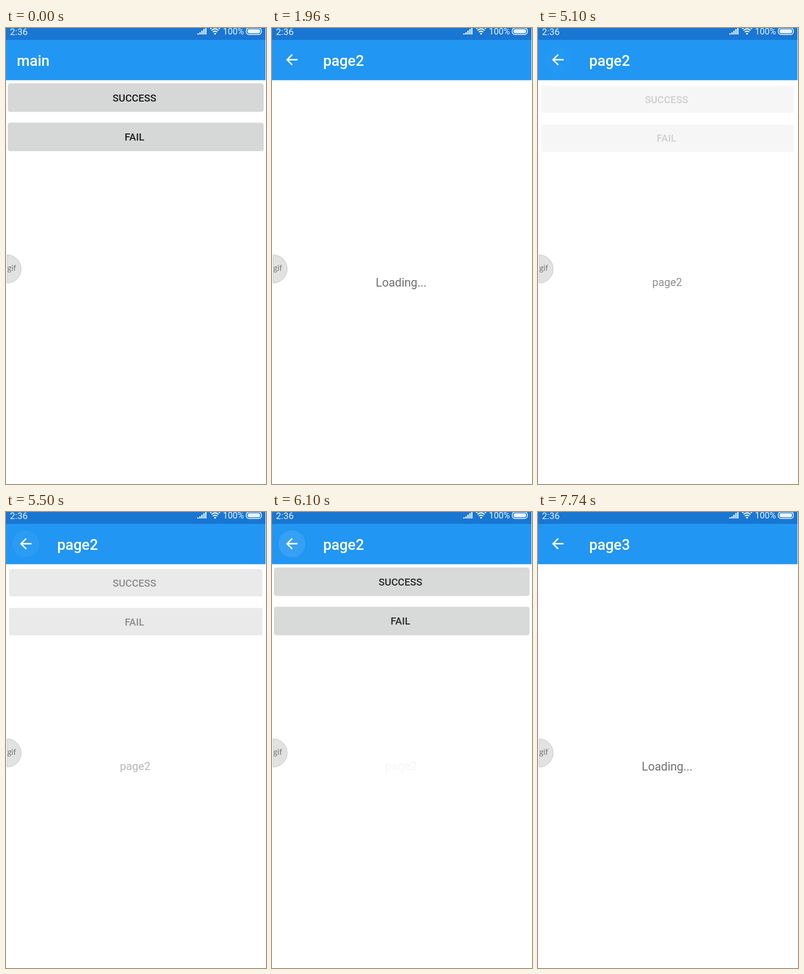
An HTML page that plays this animation: 480 px wide and 843 px high, repeating every 8000 ms.

```html
<!DOCTYPE html>
<html lang="en">
<head>
<meta charset="utf-8">
<title>Page transitions</title>
<style>
  html, body { margin: 0; width: 100%; height: 100%; overflow: hidden; background: #fff; }
  svg { display: block; width: 100%; height: 100%; font-family: Roboto, sans-serif; }
  .page { transform-origin: 238.5px 470px; text-anchor: middle; }
  .button rect { fill: #d6d7d7; filter: drop-shadow(0 .7px .8px #0006); }
  .button.pressed rect { filter: drop-shadow(0 2px 2.5px #0007); }
  .button text { font-size: 18.67px; font-weight: 500; fill: #1c1c1c; }
  #message { fill: #707070; }
</style>
</head>
<body>
<svg viewBox="0 0 480 843" preserveAspectRatio="none">
  <rect y="22" width="479" height="74.5" fill="#2196f3"/>
  <rect width="479" height="22" fill="#1976d2"/>

  <g fill="#fff" fill-opacity=".92" font-size="17">
    <text x="7.3" y="12.5">2:36</text>
    <text x="400.5" y="12" font-size="16">100%</text>
    <path d="M353 12v-2h3v2zM357 12v-4h2.4v4zM360.6 12v-7h2.4v7zM364.2 12v-10h2.4v10zM367.7 12v-13h2.4v13z"/>
    <circle cx="386" cy="10.5" r="1.8"/>
    <g fill="none" stroke="#fff" stroke-width="2">
      <path d="M382 7.5q4-3.6 8 0M379.5 4.5q6.5-6 13 0M377 1.5q9-8 18 0"/>
      <rect x="443.5" y="0" width="28" height="12" rx="5" stroke-width="1.4"/>
    </g>
    <rect x="446" y="2.3" width="23" height="7.4" rx="3"/>
  </g>

  <g id="back">
    <circle id="ripple" cx="36.5" cy="59" r="25" fill="#fff"/>
    <path transform="translate(20.5 42.7) scale(1.333)" fill="#fff"
      d="M20 11H7.83l5.59-5.59L12 4l-8 8 8 8 1.41-1.41L7.83 13H20z"/>
  </g>
  <text id="title" y="70" font-size="27.2" font-weight="500" fill="#fff"></text>

  <g id="menu" class="page">
    <g class="button" id="success">
      <rect x="4.5" y="103.5" width="470" height="50.5" rx="2.7"/>
      <text x="237.2" y="136">SUCCESS</text>
    </g>
    <g class="button" id="fail">
      <rect x="4.5" y="176" width="470" height="50.5" rx="2.7"/>
      <text x="237.2" y="208">FAIL</text>
    </g>
  </g>
  <text id="message" class="page" x="238.5"></text>

  <path d="M2 419.5a26 26 0 0 1 0 52z" fill="#e2e2e2" stroke="#c6c6c6"/>
  <text x="2.5" y="449" font-family="Lato, sans-serif" font-size="14.5" fill="#777">gif</text>
</svg>
<script>
const el = id => document.getElementById(id);
const clamp = v => Math.max(0, Math.min(1, v));

// [start time, share of the new page shown]
const OPEN_PAGE2 = [[1440, .27], [1540, .55], [1610, .76], [1690, .92], [1770, 1]];
const OPEN_PAGE3 = [[7500, 0], [7580, .4], [7660, .75], [7740, 1]];

const stepAt = (steps, t) => steps.reduce((v, [start, p]) => t >= start ? p : v, 0);

function fade(node, alpha, scale) {
  node.style.opacity = alpha;
  node.style.transform = `scale(${scale})`;
}

function setText(node, text) {
  if (node.textContent !== text) node.textContent = text;
}

function draw(t) {
  const tick = Math.floor(t / 100) * 100;
  let shown = 0, shrink = .025, page = "main";
  if (t < 5000) {
    shown = stepAt(OPEN_PAGE2, t);
    if (t >= 1210) page = "page2";
  } else if (t < 7500) {
    shown = 1 - clamp((tick - 4820) / 1360);
    shrink = .012;
    if (t < 6500) page = "page2";
  } else {
    shown = stepAt(OPEN_PAGE3, t);
    page = "page3";
  }

  const home = page === "main";
  setText(el("title"), page);
  el("title").setAttribute("x", home ? 20 : 94.4);
  el("back").style.display = home ? "none" : "";
  el("ripple").style.opacity = .09 * Math.min(clamp((tick - 4900) / 1200), clamp((6700 - tick) / 500));

  const loading = t < 3870 || t >= 7500;
  setText(el("message"), loading ? "Loading..." : "page2");
  el("message").setAttribute("y", loading ? 478 : 476.5);
  el("message").setAttribute("font-size", loading ? 21.5 : 19.5);

  el("success").classList.toggle("pressed", t >= 1210 && t < 1770);
  el("fail").classList.toggle("pressed", t >= 7500);
  fade(el("menu"), 1 - shown, 1 - shrink * shown);
  fade(el("message"), shown, 1.1 - .1 * shown);
}

function frame() {
  draw(performance.now() % 8000);
  requestAnimationFrame(frame);
}
frame();
</script>
</body>
</html>
```
